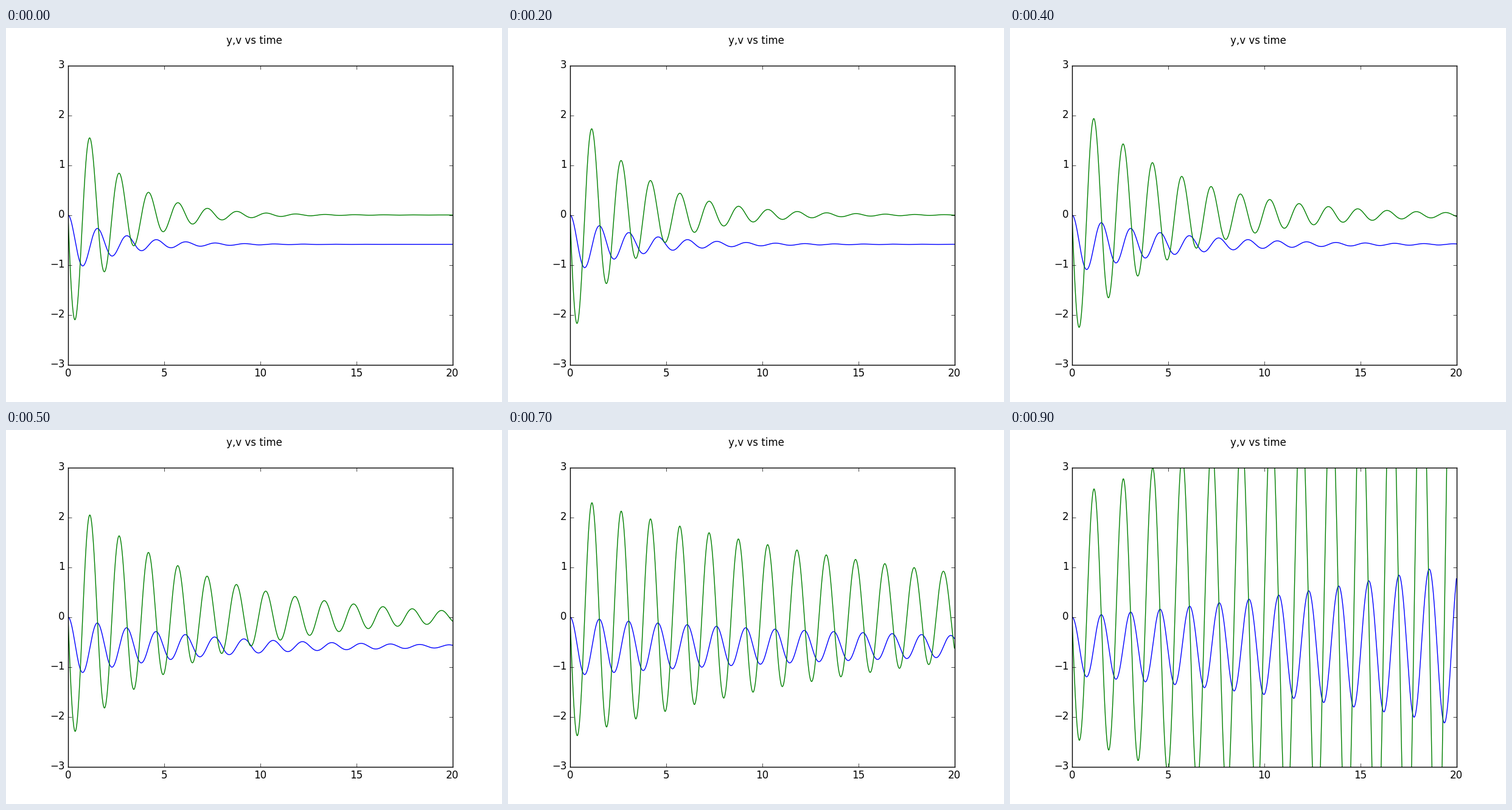
Write a matplotlib script that moves like this. It is 815x615 px and loops after 1 s.

```python
import numpy as np
import matplotlib.pyplot as plt
from matplotlib.animation import FuncAnimation

plt.style.use("classic")

WIDTH, HEIGHT, DPI = 815, 615, 100
FRAMES, INTERVAL = 10, 100
GRAVITY = 10.0
K_BELOW, K_ABOVE = 17.0, 13.0  # the spring is softer above its rest point
DURATION, STEPS = 20.0, 2000


def derivative(state, damping):
    y, v = state
    stiffness = np.where(y > 0, K_ABOVE, K_BELOW)
    return np.array([v, -GRAVITY - stiffness * y - damping * v])


def simulate(damping):
    """Integrate every damping value at once with fourth-order Runge-Kutta."""
    dt = DURATION / STEPS
    path = np.zeros((STEPS + 1, 2, len(damping)))
    for i in range(STEPS):
        s = path[i]
        k1 = derivative(s, damping)
        k2 = derivative(s + dt / 2 * k1, damping)
        k3 = derivative(s + dt / 2 * k2, damping)
        k4 = derivative(s + dt * k3, damping)
        path[i + 1] = s + dt / 6 * (k1 + 2 * k2 + 2 * k3 + k4)
    return path


time = np.linspace(0, DURATION, STEPS + 1)
paths = simulate(0.8 - 0.1 * np.arange(FRAMES))

fig, ax = plt.subplots(figsize=(WIDTH / DPI, HEIGHT / DPI), dpi=DPI,
                       facecolor="white")
fig.suptitle("y,v vs time")
ax.set_xlim(0, DURATION)
ax.set_ylim(-3, 3)
position, = ax.plot([], [], color="#0000ff")
velocity, = ax.plot([], [], color="#008000")


def update(frame):
    position.set_data(time, paths[:, 0, frame])
    velocity.set_data(time, paths[:, 1, frame])
    return position, velocity


anim = FuncAnimation(fig, update, frames=FRAMES, interval=INTERVAL,
                     repeat=True, repeat_delay=0)
plt.show()
```
